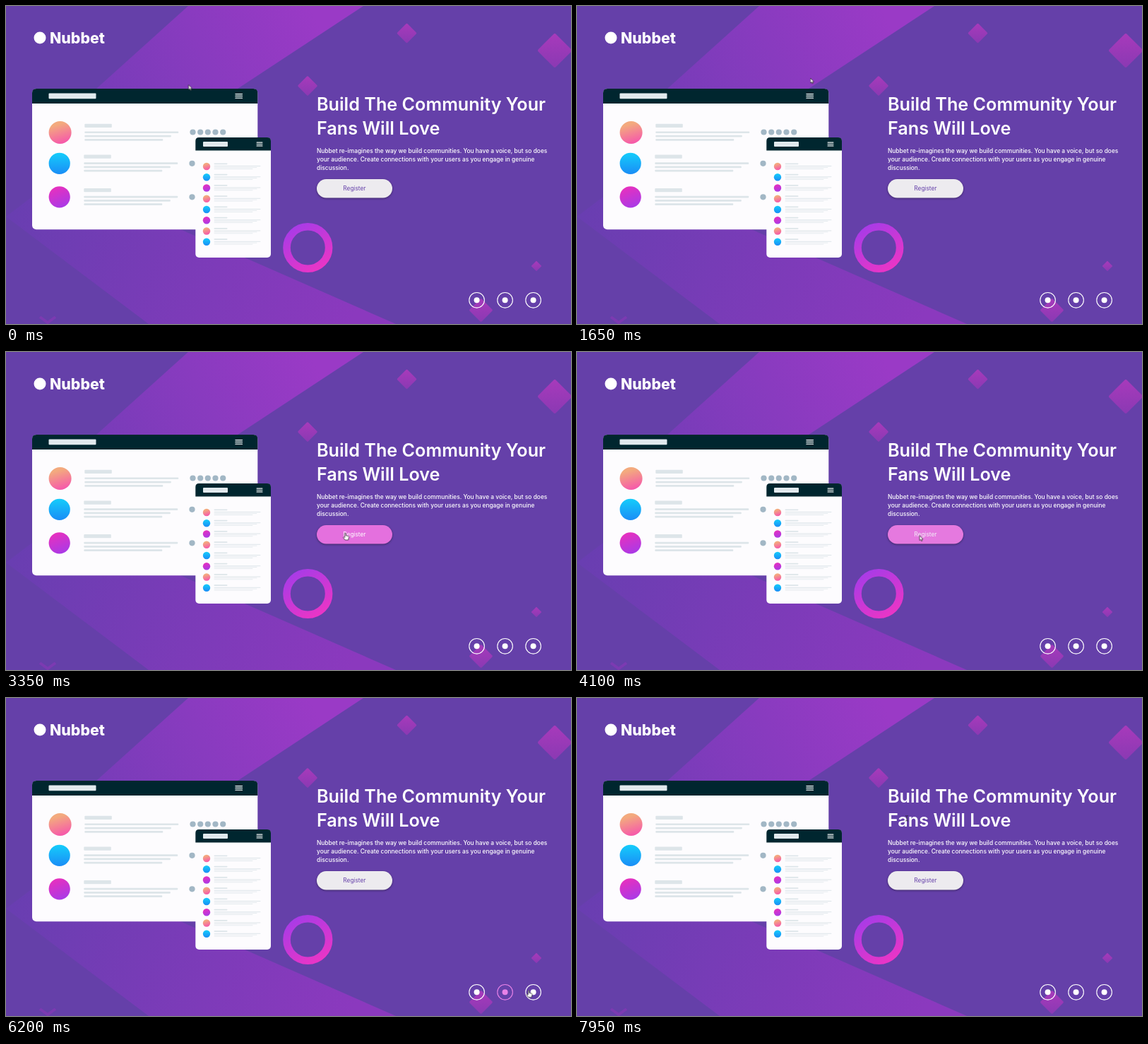
These frames come from a looping animation (800 by 450 pixels, 8 s). An HTML page:

```html
<!DOCTYPE html>
<html lang="en">
<head>
<meta charset="utf-8">
<title>Nubbet</title>
<style>
html, body { margin: 0; width: 100%; height: 100%; overflow: hidden; background: #6540a9; }
svg { display: block; width: 100%; height: 100%; font-family: Inter, "Open Sans", sans-serif; }
text { fill: #fff; }
.brand { font-size: 21.3px; font-weight: 800; }
.title { font-size: 25.2px; font-weight: 600; }
.copy { font-size: 8.4px; font-weight: 500; }
.button { fill: #edebef; filter: drop-shadow(0 1.5px 1.5px #0006); animation: button 8s infinite; }
.label { font-size: 8.3px; text-anchor: middle; fill: #6540a9; animation: label 8s infinite; }
.social { color: #fff; --hot: #e882e8; }
.first { --hot: #c66ad6; animation: first 8s infinite; }
.second { animation: second 8s infinite; }
.third { animation: third 8s infinite; }
.cursor { animation: travel 8s infinite ease-in-out; }
.cursor g { visibility: hidden; fill: #fff; stroke: #222; stroke-width: .7; stroke-linejoin: round; }
.cursor .arrow { animation: arrow 8s infinite step-end; }
.cursor .hand { animation: hand 8s infinite step-end; }
.cursor .beam { animation: beam 8s infinite step-end; }

@keyframes button {
  0%, 38%, 54%, 100% { fill: #edebef; }
  40.5%, 51% { fill: #e470de; }
}
@keyframes label {
  0%, 38%, 54%, 100% { fill: #6540a9; }
  40.5%, 51% { fill: #fff; }
}
@keyframes first {
  0%, 59.5%, 71%, 100% { color: #fff; }
  61.5%, 68% { color: var(--hot); }
}
@keyframes second {
  0%, 68.5%, 80.5%, 100% { color: #fff; }
  71%, 77.8% { color: var(--hot); }
}
@keyframes third {
  0%, 77.6%, 91%, 100% { color: #fff; }
  80.5%, 88% { color: var(--hot); }
}
@keyframes travel {
  0% { transform: translate(258.5px, 111.5px); }
  20.5%, 22% { transform: translate(330.5px, 102px); }
  29% { transform: translate(445px, 142px); }
  36% { transform: translate(453px, 222px); }
  40.5%, 50% { transform: translate(480.5px, 256px); }
  61.5%, 66% { transform: translate(672px, 408px); }
  70%, 74% { transform: translate(705px, 412px); }
  77.4% { transform: translate(740px, 413.5px); }
  81%, 87% { transform: translate(746px, 413px); }
  99%, 100% { transform: translate(467px, 170px); }
}
@keyframes arrow {
  0%, 31%, 51%, 90% { visibility: visible; }
  26%, 38%, 61%, 98%, 100% { visibility: hidden; }
}
@keyframes hand {
  0%, 51%, 90%, 100% { visibility: hidden; }
  38%, 61% { visibility: visible; }
}
@keyframes beam {
  0% { visibility: hidden; }
  98%, 100% { visibility: visible; }
}
</style>
</head>
<body>
<svg viewBox="0 0 800 450" preserveAspectRatio="none">
  <defs>
    <linearGradient id="upper" gradientUnits="userSpaceOnUse" x1="130" y1="140" x2="430" y2="0">
      <stop stop-color="#773cb8"/><stop offset="1" stop-color="#9a3ac6"/>
    </linearGradient>
    <linearGradient id="lower" gradientUnits="userSpaceOnUse" x1="10" y1="285" x2="480" y2="470">
      <stop stop-color="#693eb1"/><stop offset="1" stop-color="#8b39be"/>
    </linearGradient>
    <linearGradient id="gem" x1="0" y1="0" x2="1" y2="1">
      <stop stop-color="#a83abb"/><stop offset="1" stop-color="#8a39b3"/>
    </linearGradient>
    <linearGradient id="ring" x1=".2" y1="0" x2=".8" y2="1">
      <stop stop-color="#a93be6"/><stop offset="1" stop-color="#ea35c6"/>
    </linearGradient>
    <linearGradient id="peach" x1=".35" y1="0" x2=".65" y2="1">
      <stop offset=".15" stop-color="#f3aa7e"/><stop offset="1" stop-color="#f655ac"/>
    </linearGradient>
    <linearGradient id="blue" x1="0" y1="0" x2="0" y2="1">
      <stop stop-color="#15cdfb"/><stop offset="1" stop-color="#1a8df6"/>
    </linearGradient>
    <linearGradient id="pink" x1=".3" y1="0" x2=".7" y2="1">
      <stop stop-color="#e930bd"/><stop offset="1" stop-color="#a83ae8"/>
    </linearGradient>
  </defs>

  <path fill="#6540a9" d="M0 0H800V450H0z"/>
  <path fill="url(#upper)" d="M258 0H506L328 117L200 200H37V199L128 117z"/>
  <path fill="url(#lower)" d="M0 298L37 270L142 270L552 450H202z"/>
  <g id="gems" fill="url(#gem)"></g>
  <path d="M48 440L59 448L70 440" fill="none" stroke="#7c3ab2" stroke-width="4"/>
  <circle cx="427.3" cy="342" r="29.8" fill="none" stroke="url(#ring)" stroke-width="10.6"/>

  <g id="mockups"></g>

  <circle cx="48" cy="45" r="8.5" fill="#fff"/>
  <text class="brand" x="62" y="52.8">Nubbet</text>

  <g class="title">
    <text x="440" y="148.3">Build The Community Your</text>
    <text x="440" y="181.8">Fans Will Love</text>
  </g>
  <g class="copy">
    <text x="440" y="208">Nubbet re-imagines the way we build communities. You have a voice, but so does</text>
    <text x="440" y="220">your audience. Create connections with your users as you engage in genuine</text>
    <text x="440" y="232">discussion.</text>
  </g>
  <rect class="button" x="440" y="245" width="107" height="26.5" rx="13.25"/>
  <text class="label" x="493.4" y="261">Register</text>

  <g id="socials"></g>

  <g class="cursor">
    <g class="arrow"><path d="M0 0V7L1.6 5.6L2.7 8L3.8 7.5L2.8 5.2H4.8z"/></g>
    <g class="hand"><path d="M-.8 .8Q0-.8 .8 .8V3.8L4.4 4.6Q5.2 5 5 6.2L4.2 10H-.4L-3 6.6Q-2.8 5.2-.8 6.4z"/></g>
    <g class="beam"><path fill="none" d="M-2-3.5Q0-3.5 0-2.5V3Q0 4-2 4M2-3.5Q0-3.5 0-2.5M0 3Q0 4 2 4"/></g>
  </g>
</svg>
<script>
const put = (id, markup) => { document.getElementById(id).innerHTML = markup; };
const bar = (x, y, w, h, fill = "#dde5e9") =>
  `<rect x="${x}" y="${y}" width="${w}" height="${h}" rx="${Math.min(1, h / 2)}" fill="${fill}"/>`;
const dot = (x, y, r, fill) => `<circle cx="${x}" cy="${y}" r="${r}" fill="${fill}"/>`;
const tints = ["peach", "blue", "pink"].map(id => `url(#${id})`);

const gem = ([x, y, r]) => {
  const side = r * 1.5;
  return `<rect x="${-side / 2}" y="${-side / 2}" width="${side}" height="${side}" rx="${r / 9}"
    transform="translate(${x} ${y}) rotate(45)"/>`;
};
put("gems", [[567.5, 38.5, 13.5], [777, 63, 23.5], [427, 113, 13.5], [751, 368, 7], [672.5, 430.5, 16]]
  .map(gem).join(""));

const panel = (x, y, w, h, head, r) =>
  `<rect x="${x}" y="${y}" width="${w}" height="${h}" rx="${r}" fill="#fdfcfe"/>
   <path fill="#00262f" d="M${x} ${y + head}v${r - head}q0 ${-r} ${r} ${-r}h${w - 2 * r}q${r} 0 ${r} ${r}v${head - r}z"/>`;
const menu = (x, y, w, gap) => [0, 1, 2].map(i => bar(x, y + i * gap, w, 1.2, "#fff")).join("");

const wideRow = (y, i) => {
  const x = i ? 110.3 : 111.3;
  const dots = i ? [263.5] : [264.5, 275.2, 285.8, 296.5, 307.2];
  return dot(i ? 75.7 : 76.6, y, i ? 15.1 : 16, tints[i])
    + bar(x, y - 12.2, 38.5, 5.2)
    + [133, 122.5, 111].map((w, k) => bar(x, y - 1.6 + k * 5.3, w, 2.7)).join("")
    + dots.map(cx => dot(cx, y - (i ? 0 : .5), 4.1, "#a2b7c5")).join("");
};
const slimRow = (_, i) => {
  const y = 227 + i * 15.25;
  return dot(284, y, 5.2, tints[i % 3])
    + bar(294.5, y - 4.6, 19, 1.9)
    + [66, 61, 55].map((w, k) => bar(294.5, y - .9 + k * 1.9, w, .8)).join("");
};
put("mockups",
  panel(37, 117, 319.3, 199.3, 21, 6) + bar(60.5, 123.5, 67, 7.8, "#e1e9ed") + menu(324.3, 124, 10.8, 2.8)
  + [179, 222.8, 270.3].map(wideRow).join("")
  + panel(268.3, 186, 106.7, 170, 18.4, 5) + bar(279, 192, 35, 7, "#e1e9ed") + menu(354.5, 192.5, 9, 2.4)
  + [...Array(8)].map(slimRow).join(""));

put("socials", ["first", "second", "third"].map((name, i) => {
  const x = 666.6 + i * 40;
  return `<g class="social ${name}">
    <circle cx="${x}" cy="416.3" r="10.8" fill="none" stroke="currentColor" stroke-width="1.1"/>
    ${dot(x, 416.3, 4, "currentColor")}</g>`;
}).join(""));
</script>
</body>
</html>
```
